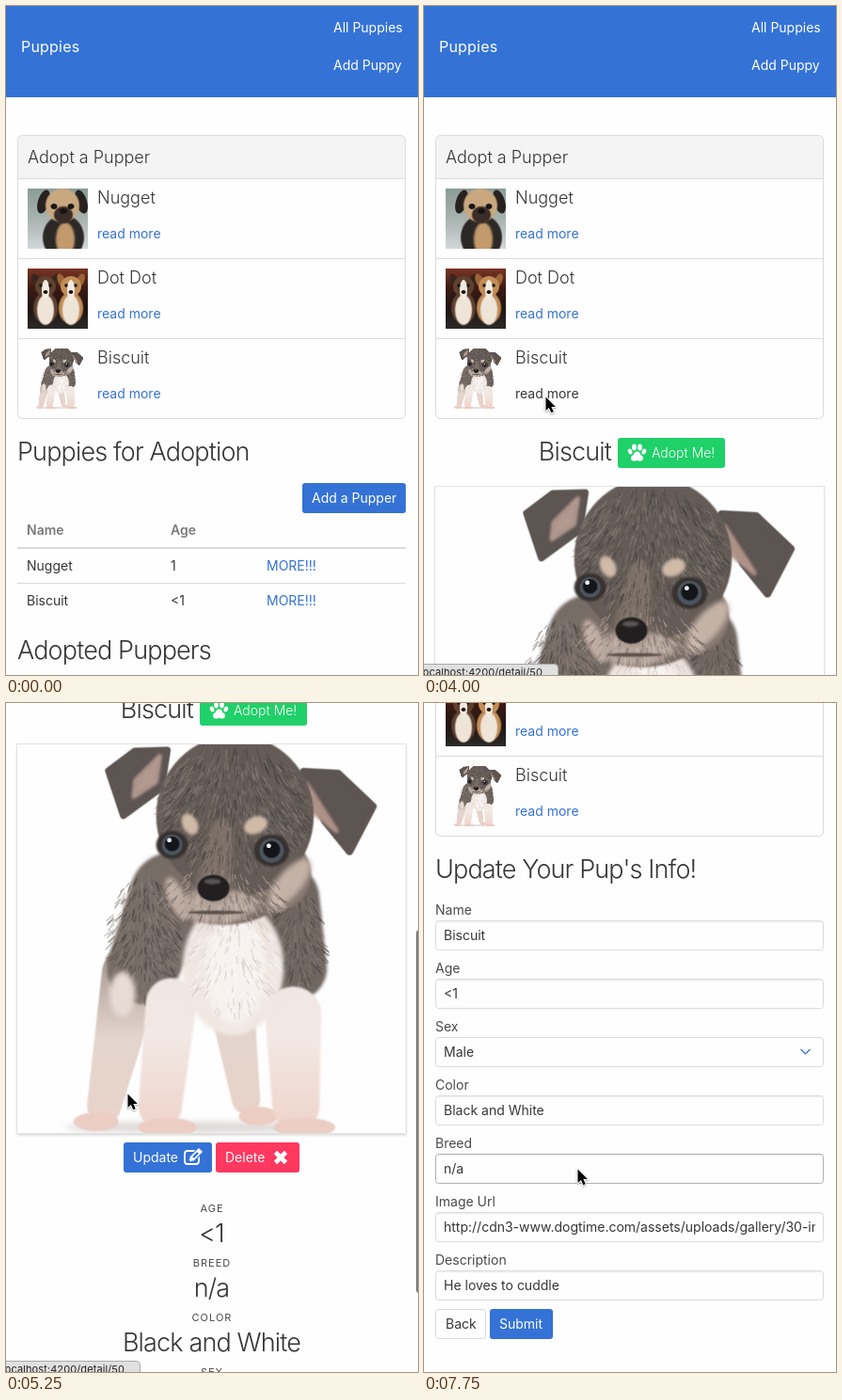
An HTML page with a canvas for the animation above (8000 ms loop, 438x711 px).

```html
<!DOCTYPE html>
<html lang="en">
<head>
<meta charset="utf-8">
<title>Puppies</title>
<style>
  html, body { margin: 0; width: 100%; height: 100%; overflow: hidden; background: #fefefe; }
  canvas { display: block; width: 438px; height: 711px; }
</style>
</head>
<body>
<canvas id="stage"></canvas>
<script>
const W = 438, H = 711, LOOP = 8000, STEP = 250;
const BLUE = '#3472d6', GREEN = '#20d068', RED = '#ff3860';
const PAPER = '#fefefe', DARK = '#363636', BODY = '#4a4a4a', LINE = '#dbdbdb';
const PUPS = ['Nugget', 'Dot Dot', 'Biscuit'];

const HOVER_AT = 2000, STATUS_AT = 2750, DETAIL_AT = 3250, SCROLL_AT = 4000,
  LEAVE_AT = 5250, UPDATE_HOVER_AT = 5750, FORM_AT = 6500, STATUS_END = 7250, SETTLE_AT = 7750;

const canvas = document.getElementById('stage');
const ctx = canvas.getContext('2d');
const ratio = window.devicePixelRatio || 1;
canvas.width = W * ratio;
canvas.height = H * ratio;

// ---- Motion ----

const progress = (t, start, length) => Math.min(1, Math.max(0, (t - start) / length));
const smooth = p => p * p * (3 - 2 * p);
const mix = (a, b, p) => a + (b - a) * p;

function cursorAt(t) {
  const cross = progress(t, 250, 1500) ** 1.2;
  const aim = progress(t, 1750, 500);
  const leave = smooth(progress(t, LEAVE_AT, 500));
  return {
    x: Math.round(mix(375, 137, cross) - 8 * aim + 34 * leave),
    y: Math.round(mix(31, 402, cross) + 13 * aim + 80 * leave)
  };
}

function scrollAt(t) {
  if (t >= SETTLE_AT) return 297;
  if (t >= FORM_AT) return 296;
  return Math.round(468 * smooth(progress(t, SCROLL_AT, 1280)));
}

// ---- Drawing helpers ----

function text(str, x, y, { size = 14, weight = 400, color = DARK, align = 'left', spacing = 0 } = {}) {
  ctx.font = `${weight} ${size}px Inter, Roboto, sans-serif`;
  ctx.letterSpacing = spacing + 'px';
  ctx.textAlign = align;
  ctx.fillStyle = color;
  ctx.fillText(str, x, y);
}
const heading = (str, x, y, align) => text(str, x, y, { size: 27, weight: 300, spacing: -0.85, align });

function box(x, y, w, h, r, fill, stroke) {
  ctx.beginPath();
  ctx.roundRect(x, y, w, h, r);
  if (fill) { ctx.fillStyle = fill; ctx.fill(); }
  if (stroke) { ctx.lineWidth = 1; ctx.strokeStyle = stroke; ctx.stroke(); }
}

function button(label, x, y, w, fill, pad = 10, weight = 400) {
  box(x, y, w, 32, 3, fill);
  text(label, x + pad, y + 21, { color: '#fff', weight });
}

function line(x0, y0, x1, y1, width, color) {
  ctx.lineWidth = width;
  ctx.strokeStyle = color;
  ctx.beginPath();
  ctx.moveTo(x0, y0);
  ctx.lineTo(x1, y1);
  ctx.stroke();
}

function rule(y, h = 1) {
  ctx.fillStyle = LINE;
  ctx.fillRect(12, y, 413, h);
}

// ---- Pictures, painted once ----

function picture(size, paint) {
  const c = document.createElement('canvas');
  c.width = c.height = size * 2;
  const g = c.getContext('2d');
  g.scale(2, 2);
  g.lineCap = g.lineJoin = 'round';
  let seed = 7;
  const random = () => (seed = seed * 16807 % 2147483647) / 2147483647;
  const use = (color, blur) => {
    g.filter = blur ? `blur(${blur}px)` : 'none';
    g.fillStyle = g.strokeStyle = color;
    g.beginPath();
  };
  paint({
    fill(color) {
      use(color);
      g.fillRect(0, 0, size, size);
    },
    fade(...stops) {
      const grad = g.createLinearGradient(0, 0, 0, size);
      stops.forEach((s, i) => grad.addColorStop(i / (stops.length - 1), s));
      return grad;
    },
    oval(color, x, y, rx, ry = rx, blur = 0, turn = 0) {
      use(color, blur);
      g.ellipse(x, y, rx, ry, turn, 0, 7);
      g.fill();
    },
    // Tapered limb: a chain of circles between two joints.
    limb(color, x0, y0, r0, x1, y1, r1, blur = 1.5) {
      use(color, blur);
      for (let p = 0; p <= 1; p += 0.02) {
        const x = mix(x0, x1, p), y = mix(y0, y1, p), r = mix(r0, r1, p);
        g.moveTo(x + r, y);
        g.arc(x, y, r, 0, 7);
      }
      g.fill();
    },
    patch(color, corners, round, blur = 0) {
      use(color, blur);
      corners.forEach(p => g.lineTo(...p));
      g.closePath();
      g.lineWidth = round;
      g.fill();
      g.stroke();
    },
    // Short hairs scattered over an oval, combed away from its top.
    fur(colors, x, y, rx, ry, count) {
      g.globalAlpha = 0.4;
      for (let i = 0; i < count; i++) {
        const a = random() * 7, r = Math.sqrt(random());
        const dx = Math.cos(a) * r, dy = Math.sin(a) * r;
        use(colors[i % colors.length]);
        g.lineWidth = 0.8 + random();
        g.moveTo(x + dx * rx, y + dy * ry);
        g.lineTo(x + dx * rx + dx * 7, y + dy * ry + 3 + random() * 6);
        g.stroke();
      }
      g.globalAlpha = 1;
    }
  });
  return c;
}

const greyPup = picture(414, ({ fill, fade, oval, limb, patch, fur }) => {
  const coat = '#655c57', shades = ['#443e3b', '#8d827b'];
  const hind = fade('#7b716b', '#7b716b', '#9a8c84', '#e3d5cc', '#ead2c9');
  const pale = fade('#d8cbc4', '#d8cbc4', '#efe6e1', '#f2e9e4', '#efd3ca');
  const paw = (x, y, rx) => oval('#eccdc3', x, y, rx, 10, 1.5);
  fill(PAPER);
  oval('#dedad8', 190, 408, 140, 6, 7);

  limb(hind, 122, 245, 32, 92, 388, 18);
  paw(84, 402, 24);
  limb(hind, 232, 300, 22, 244, 380, 15);
  paw(257, 396, 21);
  limb('#776d67', 165, 160, 45, 133, 240, 38, 3);
  limb('#6f6660', 282, 165, 40, 296, 240, 34, 3);
  fur(shades, 135, 205, 36, 66, 500);
  fur(shades, 300, 210, 26, 55, 250);
  oval('#e6dcd5', 112, 266, 14, 24, 6);

  limb(pale, 164, 276, 27, 152, 388, 23, 2);
  limb(pale, 294, 288, 30, 297, 388, 25, 2);
  paw(160, 408, 31);
  paw(306, 408, 33);
  oval(pale, 230, 238, 54, 72, 4);
  oval('#f7f2ef', 232, 240, 32, 58, 8);
  fur(['#ffffff', '#cbbcb3'], 230, 230, 46, 58, 220);

  patch('#5c5552', [[97, 28], [113, 76], [154, 46], [160, 6], [125, 7]], 7, 0.8);
  patch('#5c5552', [[305, 29], [342, 31], [379, 66], [354, 114], [328, 82]], 8, 0.8);
  patch('#b39a90', [[124, 56], [126, 38], [152, 12], [148, 40]], 4, 3);
  patch('#b09389', [[308, 42], [340, 92], [314, 70]], 5, 3);

  oval('#786d67', 222, 148, 67, 44, 2);
  oval('#85786f', 268, 138, 45, 42, 2);
  oval(coat, 232, 76, 84, 86, 1.5);
  oval('#c5b2a7', 290, 148, 13, 32, 6, 0.7);
  oval('#c1afa4', 170, 164, 9, 24, 5, -0.4);
  oval('#b5a59b', 212, 172, 42, 19, 5);
  limb('#7d7068', 218, 92, 12, 210, 148, 20, 5);
  fur(shades, 230, 68, 78, 68, 1100);
  fur(['#d2c3b9', '#6b605a'], 220, 160, 64, 28, 260);

  oval('#d0bba9', 184, 85, 8, 12, 3, -0.5);
  oval('#d0bba9', 254, 86, 13, 9, 3, -0.4);
  for (const [x, y, r] of [[165, 107, 13], [271, 113, 15]]) {
    oval('#37322f', x, y, r + 4, r + 2, 2);
    oval('#4d5660', x, y, r - 2, r - 2, 1);
    oval('#141518', x, y - 1, r * 0.6, r * 0.6, 1);
    oval('#e8edf2', x - 3, y - 5, 2.4);
  }
  oval('#211f1f', 209, 153, 17, 14, 1);
  oval('#5b5654', 208, 146, 9, 3, 2);
  oval('#5d524c', 212, 179, 30, 2, 1.5);
});

const tanPup = picture(64, ({ fill, fade, oval }) => {
  fill(fade('#8b9c97', '#a9b3b0', '#d3d8da'));
  oval('#2c2826', 38, 52, 22, 24, 1);
  oval('#c39a6c', 40, 54, 10, 18, 2);
  for (const s of [-1, 1]) oval('#27211f', 37 + 20 * s, 14, 6, 13, 0.6, -0.3 * s);
  oval('#c9a77f', 37, 18, 18, 18, 0.8);
  oval('#3a2d27', 38, 28, 10, 9, 1);
  for (const s of [-1, 1]) oval('#191615', 37 + 9 * s, 19, 3.5, 3, 0.6);
  oval('#171413', 38, 24, 4, 3);
});

const twoPups = picture(64, ({ fill, fade, oval }) => {
  fill(fade('#7c3524', '#3b1a14', '#1d1613', '#2d2a27'));
  const pup = (x, coat, ear) => {
    oval(coat, x, 42, 13, 17, 1);
    oval('#eee4d8', x, 44, 9, 16, 1);
    for (const s of [-1, 1]) oval(ear, x + 10 * s, 13, 4, 8, 0.5, 0.4 * s);
    oval(coat, x, 19, 11, 11, 0.6);
    oval('#f3eadf', x, 23, 4, 11, 0.7);
    for (const s of [-1, 1]) oval('#1c1614', x + 5 * s, 18, 1.7);
    oval('#1c1614', x, 25, 2.4, 2);
  };
  pup(19, '#5f4130', '#38261d');
  pup(46, '#c28c57', '#9b6539');
});

const THUMBS = [tanPup, twoPups, greyPup];

// ---- Icons ----

function paw(x, y) {
  const pad = (dx, dy, rx, ry, turn = 0) => {
    ctx.beginPath();
    ctx.ellipse(x + dx, y + dy, rx, ry, turn, 0, 7);
    ctx.fill();
  };
  ctx.fillStyle = '#fff';
  for (const s of [-1, 1]) {
    pad(s * 7.4, -1.5, 2.2, 3.1, s * 0.4);
    pad(s * 3, -6, 2.4, 3.4);
    pad(s * 3, 5.4, 3.4, 3.2);
  }
  pad(0, 3, 4, 4.4);
}

function pencilBox(x, y) {
  ctx.beginPath();
  ctx.roundRect(x + 1, y + 2, 15, 14, 3);
  ctx.lineWidth = 1.8;
  ctx.strokeStyle = '#fff';
  ctx.stroke();
  line(x + 8, y + 11, x + 19, y, 8, BLUE);
  line(x + 8, y + 11, x + 18, y + 1, 5.6, '#fff');
  line(x + 10, y + 9, x + 15, y + 4, 2.4, BLUE);
  line(x + 6.5, y + 12.5, x + 9, y + 10, 3, '#fff');
}

function cross(x, y, r = 5.5) {
  for (const s of [-1, 1]) line(x - r, y - r * s, x + r, y + r * s, 4.6, '#fff');
}

// ---- Page parts ----

function navBar() {
  ctx.fillStyle = BLUE;
  ctx.fillRect(0, 0, W, 97);
  text('Puppies', 16, 49, { size: 16, color: '#fff', spacing: 0.2 });
  text('All Puppies', 348, 28, { color: '#fff' });
  text('Add Puppy', 348, 68, { color: '#fff' });
}

function pupList(linkDark) {
  box(12.5, 137.5, 412, 46, [5, 5, 0, 0], '#f4f4f5');
  box(12.5, 137.5, 412, 301, 5, null, LINE);
  text('Adopt a Pupper', 23, 167, { size: 18, weight: 300 });
  PUPS.forEach((name, i) => {
    const y = 183 + 85 * i;
    rule(y);
    ctx.drawImage(THUMBS[i], 23, y + 11, 64, 64);
    text(name, 97, y + 27, { size: 18, weight: 300 });
    text('read more', 97, y + 64, { color: linkDark && i === 2 ? DARK : BLUE });
  });
}

function tables() {
  heading('Puppies for Adoption', 12, 483);
  button('Add a Pupper', 315, 507, 110, BLUE);
  const th = { weight: 600, color: '#7a7a7a' };
  text('Name', 22, 562, th);
  text('Age', 175, 562, th);
  rule(575, 2);
  [[PUPS[0], '1'], [PUPS[2], '<1']].forEach(([name, age], i) => {
    const y = 600 + 37 * i;
    text(name, 22, y);
    text(age, 175, y);
    text('MORE!!!', 277, y, { color: BLUE });
  });
  rule(613);
  heading('Adopted Puppers', 12, 694);
}

function detail() {
  heading(PUPS[2], 199, 483, 'right');
  button('Adopt Me!', 206, 459, 114, GREEN, 36, 300);
  paw(226.5, 475);
  ctx.save();
  ctx.shadowColor = 'rgba(10,10,10,.2)';
  ctx.shadowBlur = 3 * ratio;
  ctx.shadowOffsetY = 2 * ratio;
  box(12, 511, 413, 413, 0, PAPER);
  ctx.restore();
  ctx.drawImage(greyPup, 12, 511, 413, 413);
  box(11.5, 510.5, 414, 414, 0, null, '#e2e2e2');
  button('Update', 125, 934, 94, BLUE);
  pencilBox(189, 941);
  button('Delete', 223, 934, 89, RED);
  cross(292, 950);
  const facts = { AGE: '<1', BREED: 'n/a', COLOR: 'Black and White', SEX: 'Male' };
  Object.entries(facts).forEach(([label, value], i) => {
    text(label, 219, 1008 + 58 * i, { size: 11, color: BODY, align: 'center', spacing: 1 });
    heading(value, 218.5, 1040 + 58 * i, 'center');
  });
}

function field(label, value, y) {
  const select = label === 'Sex';
  text(label, 12, y - 6, { color: BODY });
  if (!select) {
    ctx.fillStyle = 'rgba(10,10,10,.05)';
    ctx.fillRect(13, y + 1, 411, 1.5);
  }
  box(12.5, y + 0.5, 412, 31, 3, null, label === 'Breed' ? '#b0b0b0' : LINE);
  ctx.save();
  ctx.beginPath();
  ctx.rect(21, y, 395, 32);
  ctx.clip();
  text(value, 21, y + 21);
  if (select) {
    for (const s of [-1, 1]) line(405.5 + 5 * s, y + 13, 405.5, y + 18, 1.2, BLUE);
  }
  ctx.restore();
}

function form() {
  heading("Update Your Pup's Info!", 12, 483);
  const values = {
    Name: PUPS[2], Age: '<1', Sex: 'Male', Color: 'Black and White', Breed: 'n/a',
    'Image Url': 'http://cdn3-www.dogtime.com/assets/uploads/gallery/30-impossibly',
    Description: 'He loves to cuddle'
  };
  Object.entries(values).forEach(([label, value], i) => field(label, value, 528 + 62 * i));
  box(12.5, 941.5, 53, 31, 3, null, LINE);
  text('Back', 23, 962);
  button('Submit', 70, 941, 67, BLUE);
}

// ---- Overlays ----

function statusBar(path) {
  box(-5.5, 699.5, 148, 20, 4, '#e0e0e0', '#a8a8a8');
  text('localhost:4200/' + path, -4, 712, { size: 11, color: '#222', spacing: 0.1 });
}

function scrollBar(y, h) {
  box(436, y, 6, h, 3, '#808080');
}

function arrow({ x, y }) {
  const outline = [[0, 0], [0, 14.5], [3.4, 11.4], [5.8, 16.8], [8.2, 15.8], [5.9, 10.5], [10.4, 10.5]];
  ctx.save();
  ctx.translate(x + 0.5, y + 0.5);
  ctx.beginPath();
  outline.forEach(p => ctx.lineTo(...p));
  ctx.closePath();
  ctx.shadowColor = 'rgba(0,0,0,.35)';
  ctx.shadowBlur = 2 * ratio;
  ctx.shadowOffsetY = ratio;
  ctx.lineJoin = 'round';
  ctx.lineWidth = 2;
  ctx.strokeStyle = '#fff';
  ctx.stroke();
  ctx.shadowColor = 'transparent';
  ctx.fillStyle = '#000';
  ctx.fill();
  ctx.restore();
}

function draw(t) {
  const onForm = t >= FORM_AT, scroll = scrollAt(t);
  ctx.setTransform(ratio, 0, 0, ratio, 0, 0);
  ctx.fillStyle = PAPER;
  ctx.fillRect(0, 0, W, H);

  ctx.save();
  ctx.translate(0, -scroll);
  navBar();
  pupList(t >= HOVER_AT && !onForm);
  if (onForm) form();
  else if (t >= DETAIL_AT) detail();
  else tables();
  ctx.restore();

  if (onForm && t < SETTLE_AT) scrollBar(201, 512);
  else if (t > SCROLL_AT && t < 6000) scrollBar(148 + (scroll - 294) * 0.538, 386);
  if (t >= STATUS_AT && t < STATUS_END) statusBar(t < UPDATE_HOVER_AT ? 'detail/50' : 'update/50');
  if (t >= STEP) arrow(cursorAt(t));
}

function tick() {
  const t = performance.now() % LOOP;
  draw(Math.floor(t / STEP) * STEP);
  requestAnimationFrame(tick);
}
tick();
</script>
</body>
</html>
```
